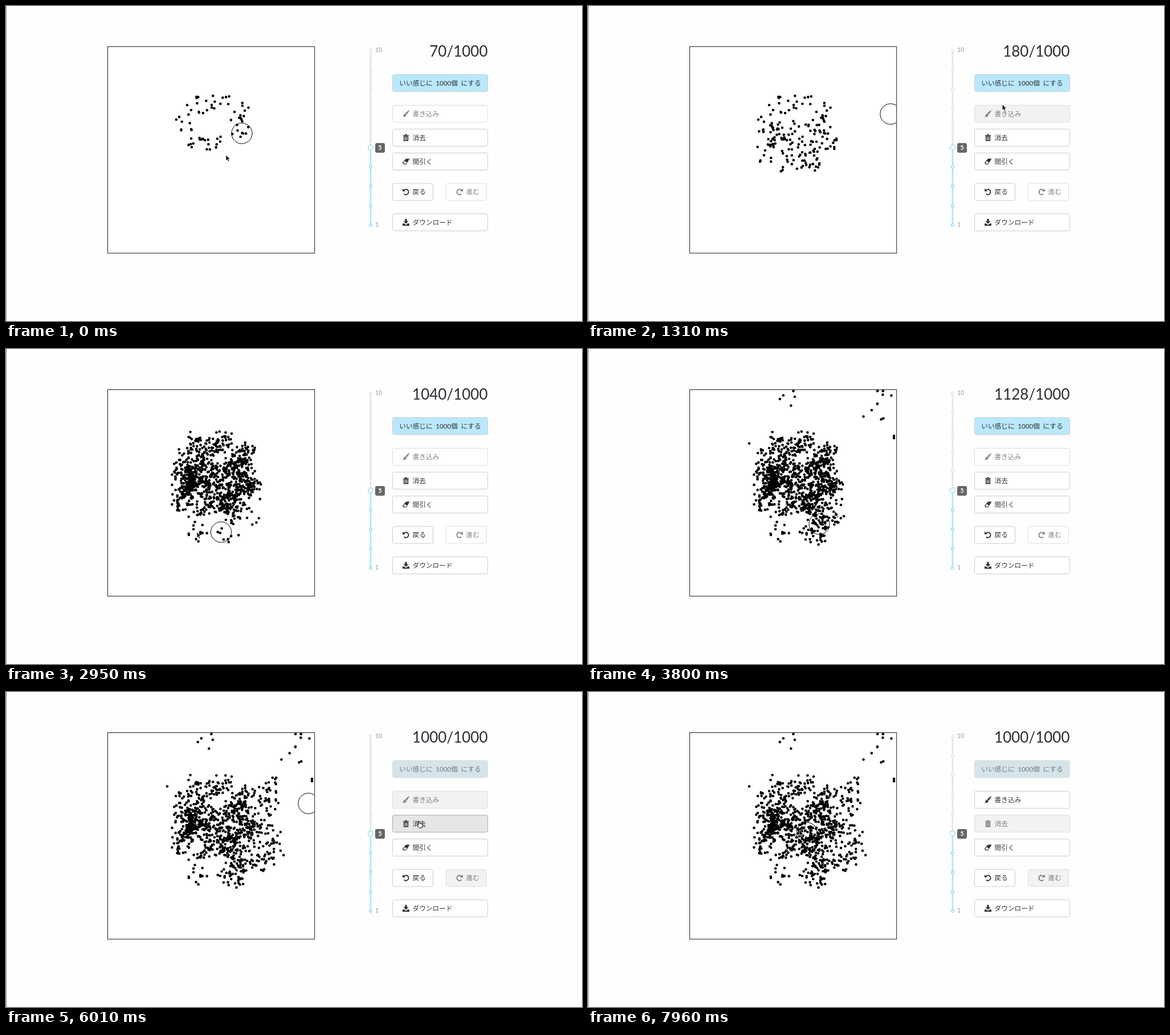
Recreate the animation shown at these times as an HTML page with a canvas. Size 1011 by 554 pixels, loop 8000 ms.

```html
<!DOCTYPE html>
<html lang="ja">
<head>
<meta charset="utf-8">
<style>
html, body { margin: 0; width: 100%; height: 100%; overflow: hidden; background: #fefefe; }
svg, canvas { position: absolute; left: 0; top: 0; width: 1011px; height: 554px; }
text { font: 11.7px Lato, "Noto Sans CJK JP", "Noto Sans CJK", sans-serif; word-spacing: 2.5px; fill: #333; }
#count { font-size: 26px; text-anchor: end; fill: #2d2a32; }
.mid { text-anchor: middle; }
.tag { font-size: 10.5px; fill: #999; }
.badge { font-size: 10.5px; font-weight: 700; fill: #fff; }
.btn rect { fill: #fff; stroke: #ccc; }
.btn path { fill: #333; }
.btn .line { fill: none; stroke: #333; stroke-width: 1.9; }
.btn .hole { fill: #fff; }
.over rect { fill: #e6e6e6; stroke: #adadad; }
.off text, .off path { opacity: .6; }
.off rect { stroke: #ddd; }
.off.over rect { fill: #f2f2f2; }
#fit rect { fill: #b9e8fd; }
#fit.off rect { fill: #d5e4ea; }
</style>
</head>
<body>
<svg id="ui" viewBox="0 0 1011 554"></svg>
<canvas id="plot" width="1011" height="554"></canvas>
<svg viewBox="0 0 1011 554">
  <g id="cursor">
    <path id="arrow" d="M0 0V10L2.3 8 3.9 11.6 5.7 10.8 4.1 7.3H7.2Z" fill="#000" stroke="#fff" stroke-width=".7"/>
    <path id="hand" d="M-1.1 1Q0-.8 1.1 1V4.4Q2.1 3.6 3 4.8 4.1 4.1 4.8 5.3 6.2 5 6.3 6.4V8.6L5.2 11.8H0L-3.7 7.6Q-4 5.8-2.4 6.2L-1.1 7.4Z" fill="#fff" stroke="#000"/>
  </g>
</svg>
<script>
const LOOP = 8000, STEP = 70, FIT = 1680, REFIT = 5250, ERASE = 7070;
const $ = id => document.getElementById(id);

// ---- interface ----
const icons = {
  brush: '<path d="M6-6.2Q6.6-5.6 1.4 1.4L-1.2-.8Q5.2-6.6 6-6.2Z"/><path d="M-1.8-.2L.8 2Q1 6-6 5.4-3.6 4-4 2-3.6-.2-1.8-.2Z"/>',
  trash: '<path d="M-5.2-4.6H-2L-1.4-6H1.4L2-4.6H5.2V-3.3H-5.2ZM-4.2-2.7H4.2V6H-4.2Z"/><path class="hole" d="M-2.6-1.2h1V4.6h-1ZM-.5-1.2h1V4.6h-1ZM1.6-1.2h1V4.6h-1Z"/>',
  eraser: '<path d="M-6 2L0-5H6.5L.5 5H-4.5Z"/><path class="hole" d="M-4.2 1.8L-2-.7 1.6 1.8 0 3.8H-3.6Z"/>',
  undo: '<path class="line" d="M-3.7-2.6A4.6 4.6 0 1 1-3.2 3.5"/><path d="M-6-6V-1H-1Z"/>',
  save: '<path d="M-1.7-6H1.7V-2H4.5L0 2.6-4.5-2H-1.7ZM-6 2H-3L0 4.6 3 2H6V6H-6Z"/>'
};
icons.redo = `<g transform="scale(-1 1)">${icons.undo}</g>`;

const buttons = [
  { id: 'fit', y: 120.5, label: 'いい感じに 1000個 にする' },
  { id: 'draw', y: 174.5, label: '書き込み', icon: 'brush' },
  { id: 'erase', y: 216.5, label: '消去', icon: 'trash' },
  { id: 'thin', y: 258.5, label: '間引く', icon: 'eraser' },
  { id: 'undo', y: 312, w: 71, label: '戻る', icon: 'undo' },
  { id: 'redo', x: 772.5, y: 312, w: 71, label: '進む', icon: 'redo' },
  { id: 'save', y: 365.5, label: 'ダウンロード', icon: 'save' }
].map(b => ({ x: 678.5, w: 167, h: 30, ...b }));

function drawButton({ id, x, y, w, h, label, icon }) {
  const mid = y + h / 2;
  const art = icon
    ? `<g transform="translate(${x + 23.5} ${mid})">${icons[icon]}</g><text x="${x + 35}" y="${mid + 4}">${label}</text>`
    : `<text class="mid" x="${x + w / 2}" y="${mid + 4}">${label}</text>`;
  return `<g id="${id}"><rect x="${x}" y="${y}" width="${w}" height="${h}" rx="3"/>${art}</g>`;
}

function drawSlider() {
  let s = '<path d="M640 78V249" stroke="#e6e6e6" stroke-width="3"/><path d="M640 249V385" stroke="#b4e7fd" stroke-width="3"/>';
  for (let i = 0; i < 10; i++) {
    s += `<circle cx="640" cy="${78 + i * 34.15}" r="${i === 5 ? 4.4 : 2.3}" fill="#fff" stroke="${i < 5 ? '#e2e2e2' : '#8fd6f6'}" stroke-width="1.3"/>`;
  }
  return s + '<rect x="648" y="241" width="17" height="17" rx="3" fill="#666"/>' +
    '<text class="badge mid" x="656.5" y="253.4">5</text>' +
    '<text class="tag" x="648" y="81">10</text><text class="tag" x="648" y="388">1</text>';
}

$('ui').innerHTML = '<path d="M.5 0V554" stroke="#8c8c8c"/>' +
  '<rect x="178.5" y="71.5" width="363.2" height="363.2" fill="#fff" stroke="#1c1c1c"/>' +
  drawSlider() + '<text id="count" x="845.5" y="88.5"></text>' + buttons.map(drawButton).join('');

// ---- pointer: start, end, evenly timed points ----
const moves = [
  [-70, 700, '414,224 386,262 366,268 335,272 313,258 318,228 326,218 360,222 400,208 398,238 389,272 389,277'],
  [770, 980, '430,250 531,190 620,215 700,230'],
  [1050, 1400, '705,226 742,138'],
  [1820, 2100, '742,138 735,152 690,200 515,265 510,227'],
  [2450, 2450, '434,258'],
  [2660, 3500, '434,250 420,322 335,322 290,180 345,85 505,90 528,140'],
  [3570, 3780, '500,200 400,328 406,308 433,285'],
  [3920, 4340, '462,300 474,268 446,245 452,200'],
  [4410, 4900, '462,185 465,172 460,162 531,196 610,210 680,205 705,185 721,146'],
  [REFIT, 5810, '735,140 770,250 805,322 770,290 728,220'],
  [5950, 6300, '725,227 735,240 728,236'],
  [6440, 6790, '728,236 720,230 727,232'],
  [ERASE, 7910, '727,232 630,262 520,268 410,256 371,243']
];
const track = moves.flatMap(([from, to, line]) => line.split(' ').map((p, i, all) => {
  const [x, y] = p.split(',').map(Number);
  return { t: from + (to - from) * i / Math.max(1, all.length - 1), x, y };
}));

function at(t) {
  const i = track.findIndex(p => p.t > t);
  if (i < 1) return i ? track.at(-1) : track[0];
  const a = track[i - 1], b = track[i], k = (t - a.t) / (b.t - a.t);
  return { x: a.x + (b.x - a.x) * k, y: a.y + (b.y - a.y) * k };
}

// the brush trails one step behind and stays at the edge while the pointer is outside
function brushAt(t) {
  do t -= STEP; while (at(t).x > 531);
  return at(t);
}

// ---- dots ----
let seed = 20;
function rnd() {
  seed = (seed + 0x6D2B79F5) | 0;
  let z = Math.imul(seed ^ seed >>> 15, 1 | seed);
  z = z + Math.imul(z ^ z >>> 7, 61 | z) ^ z;
  return ((z ^ z >>> 14) >>> 0) / 4294967296;
}
const gauss = () => Math.sqrt(-2 * Math.log(1 - rnd())) * Math.cos(2 * Math.PI * rnd());
const dots = [];

function stamp({ x, y }, born, n = 10, r = 20) {
  while (n-- > 0) {
    const a = rnd() * 2 * Math.PI, d = r * Math.sqrt(rnd());
    dots.push({
      x: Math.min(537, x + d * Math.cos(a)),
      y: Math.max(74, y + d * Math.sin(a)),
      born, dies: Infinity
    });
  }
}

function stroke(from, to, n, r) {
  const last = Math.ceil(n / 10) - 1;
  for (let i = 0; i <= last; i++) {
    const t = last ? from + (to - from) * i / last : from;
    stamp(at(t), t, Math.min(10, n - i * 10), r);
  }
}

for (let i = 0; i < 7; i++) {
  const a = .26 - i * .815;
  stamp({ x: 366 + 50 * Math.cos(a), y: 206 + 36 * Math.sin(a) }, 0);
}
stroke(70, 700, 100);
stroke(770, 770, 10);

const base = dots.length;
for (let i = base; i < 1000; i++) {
  const p = dots[Math.floor(rnd() * base)];
  dots.push({ x: p.x + gauss() * 8, y: p.y + gauss() * 8, born: FIT, dies: i < 772 ? Infinity : REFIT });
}

stroke(2660, 2940, 40);
stroke(3080, 3080, 4);
stroke(3220, 3220, 5);
stroke(3380, 3500, 12, 34);
stroke(3640, 3780, 67, 23);
stroke(3850, 4550, 100, 22);

// ---- drawing ----
const ctx = $('plot').getContext('2d');
const hit = (b, { x, y }) => x > b.x && x < b.x + b.w && y > b.y && y < b.y + b.h;

// a disabled button keeps its hover look until the dots change
function hovered(b, off, t, since) {
  if (hit(b, at(t))) return true;
  for (let s = since; off && s < t; s += STEP) if (hit(b, at(s))) return true;
  return false;
}

function render(t) {
  const live = dots.filter(d => t >= d.born && t < d.dies);
  const since = Math.max(...dots.flatMap(d => [d.born, d.dies]).filter(s => s <= t));
  ctx.clearRect(0, 0, 1011, 554);
  ctx.save();
  ctx.beginPath();
  ctx.rect(179, 72, 362, 362);
  ctx.clip();
  ctx.beginPath();
  for (const { x, y } of live) {
    ctx.moveTo(x + 2.3, y);
    ctx.arc(x, y, 2.3, 0, 7);
  }
  ctx.fill();
  const brush = brushAt(t);
  ctx.beginPath();
  ctx.arc(brush.x, brush.y, 18.1, 0, 7);
  ctx.stroke();
  ctx.restore();

  $('count').textContent = live.length + '/1000';
  const disabled = { fit: live.length === 1000, draw: t < ERASE, erase: t >= ERASE, redo: true };
  const pos = at(t);
  let pointing = false;
  for (const b of buttons) {
    const off = disabled[b.id];
    const over = hovered(b, off, t, since);
    pointing ||= over && !off;
    $(b.id).setAttribute('class', 'btn' + (off ? ' off' : '') + (over ? ' over' : ''));
  }
  $('cursor').setAttribute('transform', `translate(${pos.x} ${pos.y})`);
  $('hand').style.display = pointing ? '' : 'none';
  $('arrow').style.display = pointing ? 'none' : '';
}

const start = performance.now();
let shown = -1;
function loop() {
  const now = (performance.now() - start) % LOOP;
  const t = Math.floor((now + 1) / STEP) * STEP;
  if (t !== shown) render(shown = t);
  requestAnimationFrame(loop);
}
loop();
</script>
</body>
</html>
```
